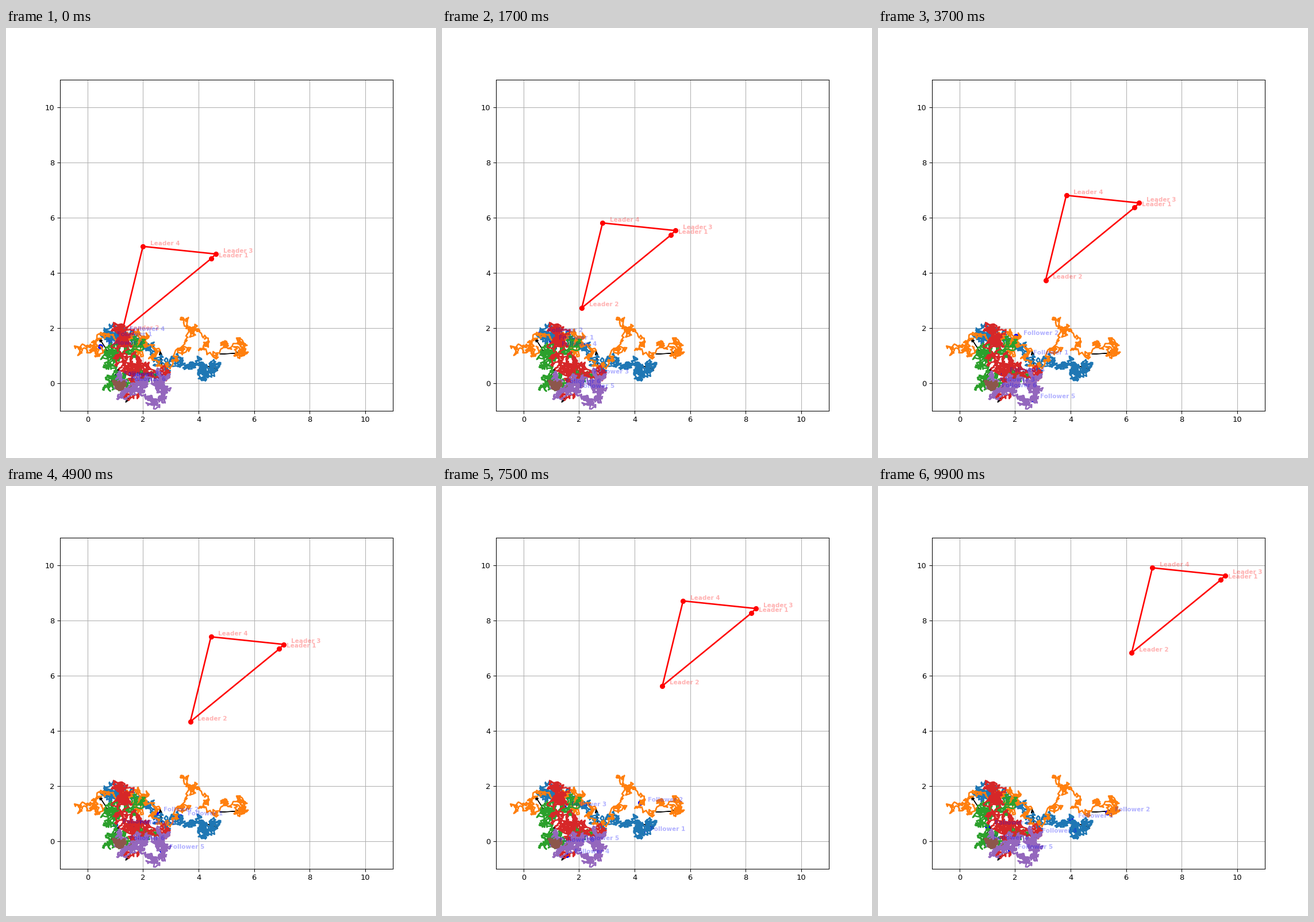
A matplotlib script that plays this animation: 748x748 px, repeating every 10000 ms.

```python
import numpy as np
import matplotlib.pyplot as plt
from matplotlib.animation import FuncAnimation

FRAMES = 100
SUBSTEPS = 10
LEADER_STEP = 0.05
LABEL_OFFSET = np.array([0.265, 0.05])
PULL = 0.96  # how much of its drift a walker keeps per substep
ARROW = 0.75


def walk(seed, step, *stops):
    """Jittery walk that passes evenly timed stops."""
    rng = np.random.default_rng(seed)
    n = (FRAMES - 1) * SUBSTEPS + 1
    drift = rng.normal(0, step, (n, 2))
    for i in range(1, n):
        drift[i] += PULL * drift[i - 1]
    keys = np.linspace(0, n - 1, len(stops)).astype(int)
    shift = np.array(stops) - drift[keys]
    guide = [np.interp(np.arange(n), keys, s) for s in shift.T]
    return drift + np.column_stack(guide)


walks = [
    walk(3, .055, (.8, 1.65), (1.05, 1.75), (2.6, .75), (3.6, .6), (4.5, .5), (4, .8)),
    walk(11, .055, (.46, 1.33), (-.3, 1.3), (1.2, 1.6), (1.8, 1.7), (2.05, 1.4),
         (3.2, .8), (3.6, 2.3), (4.1, 1.2), (5.4, 1.6), (5.33, 1.03)),
    walk(5, .055, (1.04, .22), (2.5, .45), (.9, .2), (.9, -.05), (.9, 1.2),
         (1.7, 1.5), (.9, 1.1), (1, .54)),
    walk(8, .055, (1.25, 1.85), (1.2, 1.65), (1.4, 1.2), (1.3, .8), (1.9, .8),
         (1.75, -.4), (2, .6), (2.7, .26)),
    walk(21, .055, (1.2, .2), (1.9, -.3), (2.8, -.55), (2.6, .2), (2, 0), (1.83, -.32)),
    walk(2, .018, (1.3, .03), (1.2, -.05), (.95, 0)),
]

# Leaders 1-4 and the order in which the outline joins them
leaders = np.array([(4.455, 4.515), (1.25, 1.877), (4.615, 4.68), (1.995, 4.955)])
OUTLINE = [0, 1, 3, 2, 0]

# Arrow tip and direction in degrees, one per follower
headings = [(4.7, .46, -22), (5.51, 1.09, 3), (.41, 1.64, 123),
            (2.61, 1.17, 98), (1.37, -.7, 234), (1.13, .53, 60)]

fig, ax = plt.subplots(figsize=(8, 8), dpi=93.5)
ax.set(xlim=(-1, 11), ylim=(-1, 11))
ax.grid(True)

for x, y, angle in headings:
    dx, dy = ARROW * np.cos(np.radians(angle)), ARROW * np.sin(np.radians(angle))
    ax.arrow(x - dx, y - dy, dx, dy, head_width=.1, head_length=.15,
             length_includes_head=True, fc="k", ec="k")

outline, = ax.plot([], [], "r-", lw=2)
leader_dots, = ax.plot([], [], "ro")
follower_dots, = ax.plot([], [], "bo")
for i, path in enumerate(walks):
    ax.plot(*path.T, color=f"C{i}", lw=2)


def make_labels(name, count, color):
    return [ax.text(0, 0, f"{name} {i + 1}", color=color, alpha=.3,
                    fontsize=8, weight="bold") for i in range(count)]


leader_labels = make_labels("Leader", len(leaders), "red")
follower_labels = make_labels("Follower", len(walks), "blue")


def place(dots, labels, points):
    dots.set_data(*points.T)
    for label, point in zip(labels, points):
        label.set_position(point + LABEL_OFFSET)


def update(frame):
    lead = leaders + LEADER_STEP * frame
    follow = np.array([path[frame * SUBSTEPS] for path in walks])
    outline.set_data(*lead[OUTLINE].T)
    place(leader_dots, leader_labels, lead)
    place(follower_dots, follower_labels, follow)
    return [outline, leader_dots, follower_dots, *leader_labels, *follower_labels]


anim = FuncAnimation(fig, update, frames=FRAMES, interval=100,
                     repeat=True, repeat_delay=0)
plt.show()
```
